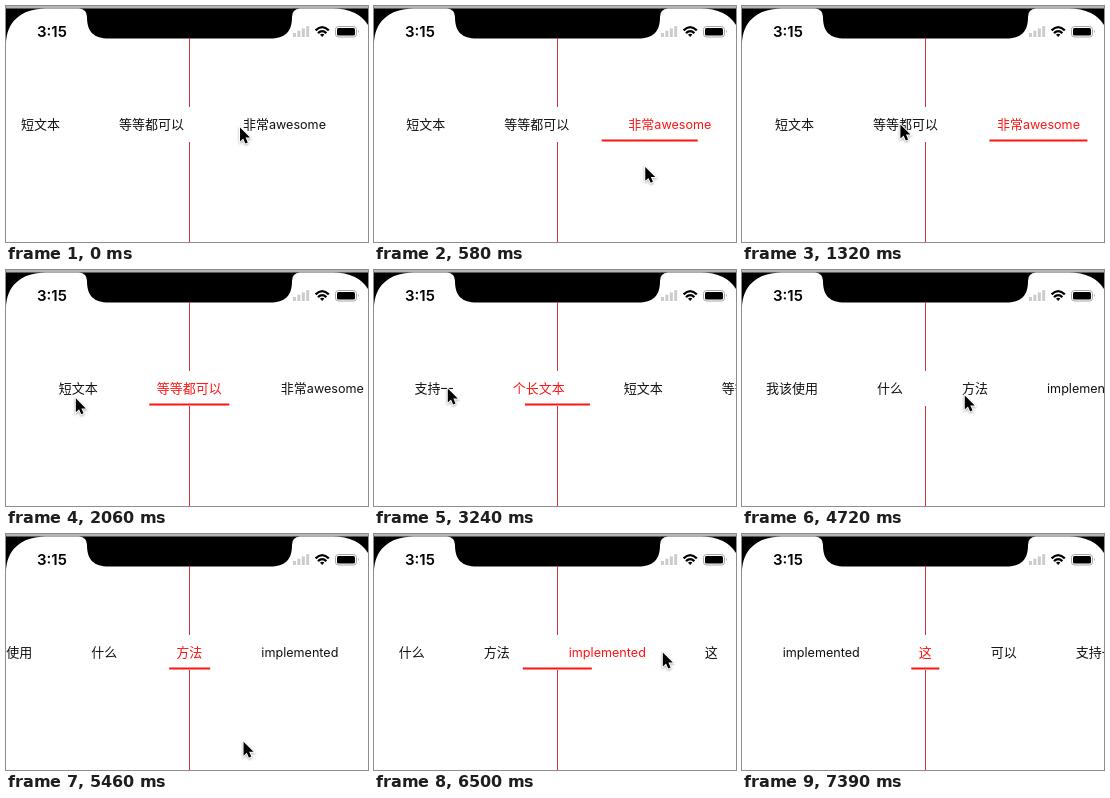
An HTML page for the animation above (7.69 s loop, 362x236 px).

```html
<!DOCTYPE html>
<html lang="zh-CN">
<head>
<meta charset="utf-8">
<title>Tab strip</title>
<style>
  html, body { margin: 0; width: 100%; height: 100%; overflow: hidden; background: #000; }
  #stage { position: relative; width: 362px; height: 236px; overflow: hidden; }
  svg { position: absolute; left: 0; top: 0; }
  #clock { font: 600 15px Inter, sans-serif; }
  #tabs { position: absolute; left: 0; top: 101px; width: 362px; height: 35px; overflow: hidden; background: #fff; }
  #strip { position: absolute; left: 0; top: 0; width: max-content; height: 35px; }
  #labels { display: flex; gap: 59px; padding-top: 7px; color: #111;
    font: 13px/20px "Noto Sans CJK SC", "Noto Sans CJK", sans-serif; white-space: nowrap; }
  .latin { font-family: Inter, sans-serif; font-size: 12.6px; line-height: 1; }
  .selected { color: #ff1414; }
  #underline { position: absolute; left: 0; top: 32px; height: 2px; background: #ff1414; }
  #cursor { width: 20px; height: 24px; overflow: visible; filter: drop-shadow(0 1px 1px #0005); }
</style>
</head>
<body>
<div id="stage">
  <svg width="362" height="236">
    <rect width="362" height="236"/>
    <rect width="362" height="2.5" fill="#b4b4b4"/>
    <path fill="#fff" d="M0 39C0 16 15 2.5 40 2.5H73Q81 3 81 11C81 26 88 32.5 103 32.5H264C279 32.5 286 26 286 11Q286 3 294 2.5H327C352 2.5 367 16 367 39V236H0Z"/>
    <path d="M183 32h1v204h-1z" fill="#d0353c"/>
    <text id="clock" x="31" y="31">3:15</text>
    <g id="signal" fill="#ccc"></g>
    <g fill="none" stroke="#000" stroke-width="2.2">
      <path d="M309.6 24.4Q316.2 18 322.8 24.4M312 27.1Q316.2 23 320.4 27.1"/>
      <path d="M314 28.6Q316.2 26.8 318.4 28.6L316.2 31Z" fill="#000" stroke="none"/>
    </g>
    <rect x="329.5" y="20.5" width="21" height="10.5" rx="3" fill="none" stroke="#a6a6a6"/>
    <rect x="331" y="22" width="18" height="7.5" rx="1.6"/>
    <path d="M352 24q1.6 1.7 0 3.6z" fill="#a6a6a6"/>
  </svg>
  <div id="tabs"><div id="strip"><div id="labels"></div><div id="underline"></div></div></div>
  <svg id="cursor" viewBox="0 0 20 24">
    <path transform="translate(1 1.5) scale(.87)" d="M0 0V16L3.7 12.6L6.2 18.3L8.9 17.1L6.4 11.6H11.5Z"
      stroke="#fff" stroke-width="2.2" paint-order="stroke"/>
  </svg>
</div>
<script>
const LOOP = 7690, STEP = 147.8, SLIDE = 350, REACTION = 250;
const CENTRE = 183.3, PAD = 7.5, MARGIN = 24, BOUNCE = 20;
const byId = id => document.getElementById(id);
const labels = byId('labels'), strip = byId('strip'), underline = byId('underline'), cursor = byId('cursor');

for (let i = 0; i < 4; i++) {
  const height = 4 + i * 2.3;
  byId('signal').innerHTML += `<rect x="${287 + i * 4.4}" y="${31 - height}" width="3" height="${height}"/>`;
}

const items = '我该使用 什么 方法 implemented 这 可以 支持一 个长文本 短文本 等等都可以 非常awesome'
  .split(' ').map(word => {
    const item = document.createElement('span');
    item.innerHTML = word.replace(/[a-z]+/, '<span class="latin">$&</span>');
    labels.append(item);
    return item;
  });

// The pointer visits a tab, dipping on the way, and clicks it a moment after arriving.
const visits = [
  { tab: 10, leave: 0, arrive: 30, dip: 0 },
  { tab: 9, leave: 440, arrive: 1310, dip: 44 },
  { tab: 8, leave: 1580, arrive: 2110, dip: 70 },
  { tab: 7, leave: 2700, arrive: 2740, dip: 0 },
  { tab: 2, leave: 3380, arrive: 4860, dip: 45 },
  { tab: 3, leave: 5115, arrive: 6050, dip: 94 },
  { tab: 4, leave: 6560, arrive: 6600, dip: 0 }
];
const firstTab = visits.at(-1).tab;

const clamp = (v, low, high) => Math.max(low, Math.min(high, v));
const mix = (a, b, p) => a + (b - a) * p;
const progress = (t, start, end) => clamp((t - start) / (end - start), 0, 1);
const ease = u => (1 - Math.cos(Math.PI * u)) / 2;

// Value at time t after a chain of eased moves
const track = (t, first, moves) => moves.reduce((value, { start, time = SLIDE, to }) =>
  mix(value, to, ease(progress(t, start, start + time))), first);

const left = strip.getBoundingClientRect().left;
const tabs = items.map(item => {
  const box = item.getBoundingClientRect();
  return { mid: box.left - left + box.width / 2, width: box.width + 2 * PAD };
});
const maxScroll = labels.getBoundingClientRect().width - 362 + MARGIN;
const moves = target => visits.map(({ tab, arrive }) => ({ start: arrive + REACTION, to: target(tabs[tab]) }));

const midMoves = moves(tab => tab.mid);
const widthMoves = moves(tab => tab.width);
// Each click centres its tab; one fling overshoots the first tab and settles.
const scrollMoves = [
  ...moves(tab => clamp(tab.mid - CENTRE, -MARGIN, maxScroll)),
  { start: 3520, time: 590, to: -MARGIN - BOUNCE },
  { start: 4130, time: 430, to: -MARGIN }
].sort((a, b) => a.start - b.start);
const scrollAt = t => track(t, maxScroll + BOUNCE * .9, scrollMoves);

function pointerAt(t) {
  let x = 233, y = mix(120, 250, ease(progress(t, 6950, 7360)));
  if (t > 0) y -= 3;
  for (const { tab, leave, arrive, dip } of visits) {
    const u = progress(t, leave, arrive);
    x = mix(x, tabs[tab].mid - scrollAt(arrive) - 6, ease(u) ** 1.5);
    y += dip * Math.sin(Math.PI * Math.sqrt(u));
  }
  return { x, y };
}

function draw(now) {
  // The picture advances at a fixed, low frame rate.
  const t = Math.min(50, Math.floor((now % LOOP + 20) / STEP)) * 147.4;
  const mid = track(t, tabs[firstTab].mid, midMoves);
  const width = track(t, tabs[firstTab].width, widthMoves);
  const { x, y } = pointerAt(t);
  const selected = visits.reduce((tab, next) => t >= next.arrive + REACTION ? next.tab : tab, firstTab);

  strip.style.transform = `translateX(${-scrollAt(t)}px)`;
  underline.style.width = width + 'px';
  underline.style.transform = `translate(${mid - width / 2}px, .5px)`;
  cursor.style.transform = `translate(${x}px, ${y}px)`;
  items.forEach((item, i) => item.classList.toggle('selected', i === selected));
}

const begin = performance.now();
function tick() {
  draw(performance.now() - begin);
  requestAnimationFrame(tick);
}
tick();
</script>
</body>
</html>
```
